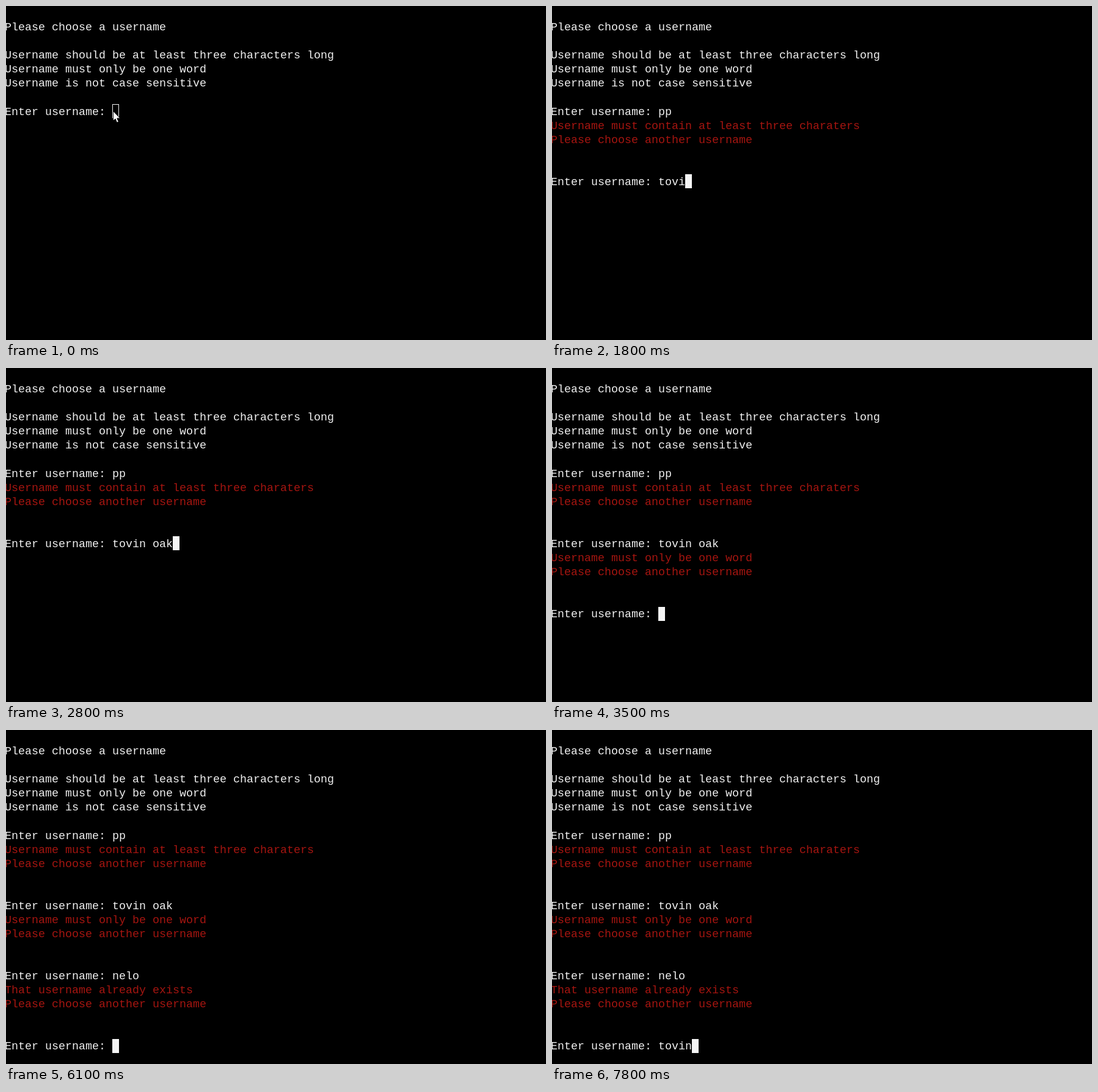
An HTML page that plays this animation: 884x548 px, repeating every 8000 ms.

```html
<!DOCTYPE html>
<html lang="en">
<head>
<meta charset="utf-8">
<title>Choose a username</title>
<style>
  html, body { margin: 0; width: 100%; height: 100%; overflow: hidden; background: #000; }
  svg { display: block; width: 884px; height: 548px; }
  text { font: 18.333px "Courier New", "Liberation Mono", monospace; fill: #f0f0f0; white-space: pre; }
  .error { fill: #a51510; }
</style>
</head>
<body>
<svg id="stage" viewBox="0 0 884 548">
  <g id="lines"></g>
  <rect id="block" width="11" height="23" fill="#f5f5f5"/>
  <g id="idle">
    <rect x="174.5" y="161.5" width="10" height="22" fill="none" stroke="#f0f0f0"/>
    <path d="M175.5 172.5V188.5L179 185.2L181.6 191.3L184.4 190.1L181.8 184.2H186.8Z" fill="#fff" stroke="#000"/>
  </g>
</svg>
<script>
const LOOP = 8000, LEFT = -2, CHAR = 11, TOP = 22.7, ROW = 23.06, BASE = 17.5;
const PROMPT = "Enter username: ";
const AGAIN = "Please choose another username";

const intro = [
  [0, "Please choose a username"],
  [2, "Username should be at least three characters long"],
  [3, "Username must only be one word"],
  [4, "Username is not case sensitive"]
];

// keys: when each character appears; error: shown once the entry is sent
const entries = [
  { row: 6, start: 0, word: "pp", keys: [100, 100], sent: 100,
    error: "Username must contain at least three charaters" },
  { row: 11, start: 100, word: "tovin oak", sent: 3500,
    keys: [1000, 1200, 1400, 1800, 2000, 2200, 2400, 2500, 2800],
    error: "Username must only be one word" },
  { row: 16, start: 3500, word: "nelo", keys: [4200, 4400, 4600, 4700], sent: 6100,
    error: "That username already exists" },
  { row: 21, start: 6100, word: "tovin", keys: [6900, 7000, 7100, 7600, 7800], sent: Infinity }
];

const byId = id => document.getElementById(id);
const lines = byId("lines"), block = byId("block"), idle = byId("idle");
const rowTop = row => TOP + row * ROW;
const show = (el, on) => el.setAttribute("visibility", on ? "visible" : "hidden");

function addLine(row, content, cls = "") {
  const el = document.createElementNS("http://www.w3.org/2000/svg", "text");
  el.setAttribute("x", LEFT);
  el.setAttribute("y", Math.round(rowTop(row) + BASE));
  el.setAttribute("class", cls);
  el.textContent = content;
  lines.append(el);
  return el;
}

intro.forEach(([row, content]) => addLine(row, content));
for (const e of entries) {
  e.line = addLine(e.row, PROMPT);
  e.errors = e.error
    ? [addLine(e.row + 1, e.error, "error"), addLine(e.row + 2, AGAIN, "error")]
    : [];
}

function draw(t) {
  for (const e of entries) {
    const typed = e.keys.filter(k => k <= t).length;
    const content = PROMPT + e.word.slice(0, typed);
    if (e.line.textContent !== content) e.line.textContent = content;
    show(e.line, t >= e.start);
    e.errors.forEach(el => show(el, t >= e.sent));
    if (t >= e.start && t < e.sent) {
      block.setAttribute("x", LEFT + content.length * CHAR);
      block.setAttribute("y", Math.round(rowTop(e.row)));
    }
  }
  const waiting = t < entries[0].sent;
  show(idle, waiting);
  show(block, !waiting);
}

const begin = performance.now();
function tick() {
  draw((performance.now() - begin) % LOOP);
  requestAnimationFrame(tick);
}
tick();
</script>
</body>
</html>
```
